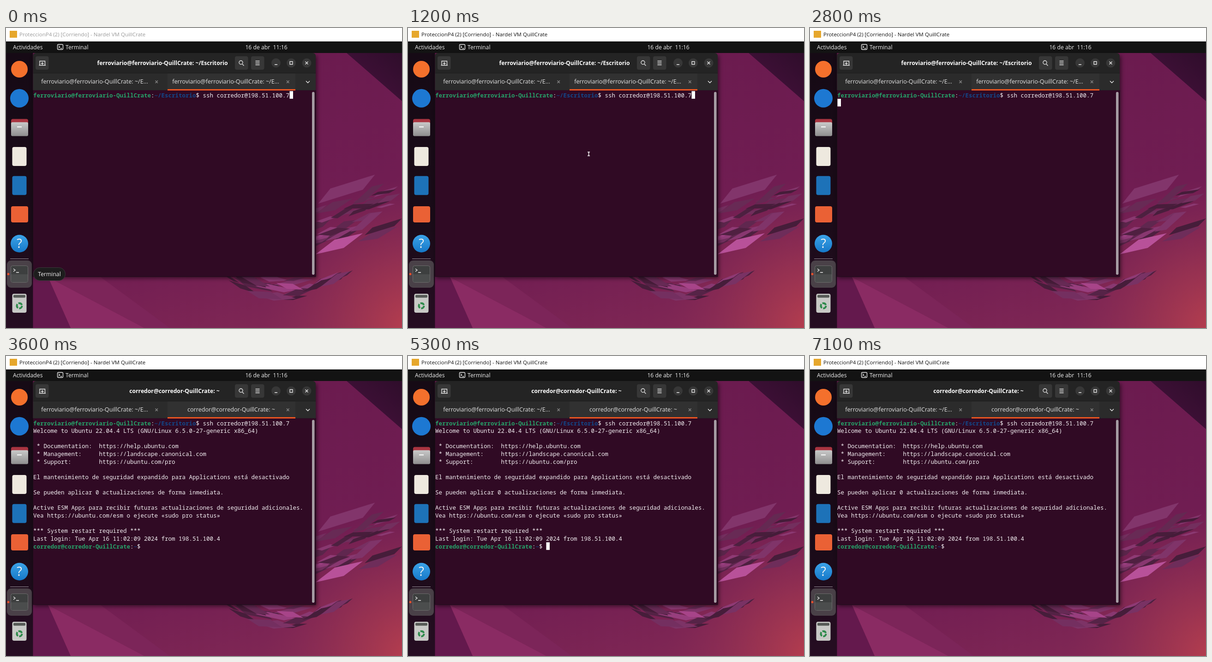
Write an HTML page that moves like this. It is 858 by 648 pixels and loops after 7.2 s.

```html
<!DOCTYPE html>
<html lang="es">
<head>
<meta charset="utf-8">
<title>Terminal</title>
<style>
html, body { margin: 0; width: 100%; height: 100%; overflow: hidden; background: #2c0a24; }
svg { display: block; width: 858px; height: 648px; }
text { font: 12.2px "Open Sans", "Noto Sans", sans-serif; fill: #f2f2f2; white-space: pre; }
.mid { text-anchor: middle; }
.title { font-weight: 700; fill: #fff; }
.tab { font-size: 12.6px; fill: #e4e4e4; }
.mono text { font: 12.5px "Noto Sans Mono", "DejaVu Sans Mono", monospace; fill: #f4f0f3; }
.user { fill: #26a269; font-weight: 700; }
.path { fill: #12488b; font-weight: 700; }
.line { fill: none; stroke: #eee; stroke-width: 1.3; }
</style>
</head>
<body>
<svg viewBox="0 0 858 648">
  <defs>
    <linearGradient id="wall" gradientUnits="userSpaceOnUse" x1="620" y1="60" x2="800" y2="660">
      <stop offset="0" stop-color="#6b1b4f"/><stop offset=".5" stop-color="#701d52"/><stop offset="1" stop-color="#842a55"/>
    </linearGradient>
    <radialGradient id="glow" gradientUnits="userSpaceOnUse" cx="880" cy="650" r="320">
      <stop offset="0" stop-color="#b83f4e"/><stop offset=".45" stop-color="#a03650" stop-opacity=".65"/>
      <stop offset="1" stop-color="#8a2c55" stop-opacity="0"/>
    </radialGradient>
    <linearGradient id="dusk" x1="1" y1="0" x2="0" y2="1">
      <stop offset="0" stop-color="#2f0d2b"/><stop offset="1" stop-color="#48123e"/>
    </linearGradient>
    <linearGradient id="dock" x2="0" y2="1">
      <stop offset="0" stop-color="#160a15"/><stop offset=".6" stop-color="#1a0b18"/><stop offset="1" stop-color="#260d22"/>
    </linearGradient>
    <linearGradient id="grey" x2="0" y2="1">
      <stop offset="0" stop-color="#c9c9c9"/><stop offset="1" stop-color="#8e8e8e"/>
    </linearGradient>
    <linearGradient id="blue" x2="0" y2="1">
      <stop offset="0" stop-color="#3ba3e8"/><stop offset="1" stop-color="#1678c8"/>
    </linearGradient>
    <filter id="soft"><feGaussianBlur stdDeviation="4"/></filter>
  </defs>

  <!-- wallpaper -->
  <path fill="url(#wall)" d="M0 28H858V648H0z"/>
  <path fill="url(#dusk)" d="M738 54H858V158z"/>
  <path fill="#8a2b63" d="M91 538L300 648H140z"/>
  <path fill="#7c2559" d="M91 538H205L355 648H300z"/>
  <path fill="#64194d" d="M58 538H91L140 648H58z"/>
  <path fill="url(#glow)" d="M400 300H858V648H400z"/>
  <g id="shards"></g>

  <!-- host title bar -->
  <path fill="#fff" d="M0 0H858V29H0z"/>
  <path fill="#e6a72c" d="M8 6h16v15H8z"/>
  <text id="host" x="29" y="18" style="font-size:11.5px">ProteccionP4 (2) [Corriendo] - Nardel VM QuillCrate</text>

  <!-- top panel -->
  <path fill="#131313" d="M0 29H858V54H0z"/>
  <text x="15" y="46">Actividades</text>
  <rect class="line" x="111.500" y="35.500" width="12" height="11" rx="2"/>
  <path class="line" d="M114 38.500l2.500 2.500l-2.500 2.500M118 44h3"/>
  <text x="129" y="46">Terminal</text>
  <text class="mid" x="564" y="45.500">16 de abr  11:16</text>

  <!-- dock -->
  <path fill="url(#dock)" d="M0 54H58.500V648H0z"/>
  <g id="icons"></g>
  <path stroke="#9a929a" d="M9 498.500H49"/>
  <rect x="2" y="502" width="54" height="59" rx="9" fill="#4a4148"/>
  <rect x="10.500" y="513.500" width="37" height="36" rx="4" fill="#3d3f3f" stroke="#6c6c6c"/>
  <path fill="#4b4d4d" d="M11 532H47V545q0 4-4 4H15q-4 0-4-4z"/>
  <path class="line" d="M16 520l4 3l-4 3M22 528h6"/>
  <circle cx="5" cy="531.500" r="2.500" fill="#e5502c"/>

  <!-- window -->
  <path filter="url(#soft)" opacity=".5" d="M60 60H674V541H60z"/>
  <path fill="#300a24" stroke="#1b0d18" d="M58.500 134H671V537H58.500z"/>
  <path fill="#242424" d="M58.500 98V61q0-7 7-7H664q7 0 7 7V98z"/>
  <path fill="#2b2b2b" d="M58.500 97.500H671V134.500H58.500z"/>
  <path stroke="#1c1c1c" d="M58.500 97.500H671"/>
  <path fill="#313131" d="M350 98H627V132H350z"/>
  <path fill="#e95420" d="M350 132H627V135H350z"/>
  <g id="buttons" fill="#373737"></g>
  <path class="line" d="M73 80.500V71.500H84.500V80.500M71.500 80.500H86M78.700 73.500v6M75.700 76.500h6"/>
  <circle class="line" cx="509" cy="74.500" r="4"/>
  <path class="line" d="M512 78l3.500 3.500M540.500 71.500h9m-9 4h9m-9 4h9M582 79h6M615 72.500h6v6h-6zM648.500 72.500l6 6m0-6l-6 6M650 114.500l4 4l4-4"/>
  <path class="line" style="stroke:#8c8c8c" d="M323.500 113.500l5.500 5.500m0-5.500l-5.500 5.500M608 113.500l5.500 5.500m0-5.500l-5.500 5.500"/>
  <text class="mid title" id="title" y="80"></text>
  <text class="mid tab" id="tab1" x="192" y="120"></text>
  <text class="mid tab" id="tab2" y="120"></text>
  <rect x="663" y="138" width="5.500" height="395" rx="2.700" fill="#a69da4"/>
  <g class="mono"><g id="command"></g><g id="output"></g></g>
  <rect id="caret" width="7.500" height="16.500" fill="#fff"/>

  <g id="tip">
    <rect x="59.500" y="517.500" width="69" height="28" rx="14" fill="#1d1d1d" stroke="#3a383a"/>
    <text class="mid" x="94" y="536">Terminal</text>
  </g>
  <path id="mouse" fill="none" stroke="#fff" stroke-width="1.500" d="M-2.500-4h5M0-4v8M-2.500 4h5"/>
</svg>
<script>
const $ = id => document.getElementById(id);
const LOOP = 7200, FOCUS = 1200, ENTER = 2600, LOGIN = 3200;
const BLINK_FROM = 3400, BLINK = 610;
const CELL = 7.5, ROW = 16.63, LEFT = 59, TOP = 149.5;
const box = 'QuillCrate', local = 'ferroviario@ferroviario-' + box, remote = 'corredor@corredor-' + box;

let seed = 7;
const rand = (lo = 0, hi = 1) => {
  seed = seed * 16807 % 2147483647;
  return lo + (hi - lo) * seed / 2147483647;
};

// A long thin facet, pointed at both ends
function shard(x, y, tilt, length, light) {
  const h = length * rand(.06, .13), bend = rand(-.25, .25) * length;
  return `<path fill="hsl(318 42% ${light}%)" transform="translate(${x} ${y}) rotate(${tilt})"
    d="M${-length / 2} 0L${bend} ${-h}L${length / 2} 0L${-bend} ${h}z"/>`;
}
const shade = () => 19 + 24 * rand() ** 2;

// Right fan rises to the right; the lower one hangs in an arc under the window
let facets = '';
for (let i = 0; i < 30; i++) {
  const u = rand(), y = 495 - 110 * rand() - 45 * u;
  facets += shard(672 + 165 * u, y, rand(-34, -8), rand(40, 95), shade());
}
for (let i = 0; i < 24; i++) {
  const u = rand(), arc = Math.PI * u;
  facets += shard(475 + 250 * u, 538 + 50 * rand() * Math.sin(arc), 28 * Math.cos(arc), rand(45, 90), shade());
}
facets += shard(738, 348, -27, 138, 36) + shard(722, 466, -24, 112, 52) + shard(615, 558, 14, 60, 46);
$('shards').innerHTML = facets;

// Dock icons at even steps
const rect = (x, y, w, h, r, fill) => `<rect x="${x}" y="${y}" width="${w}" height="${h}" rx="${r}" fill="${fill}"/>`;
const disc = (y, r, fill) => `<circle cx="29" cy="${y}" r="${r}" fill="${fill}"/>`;
const card = (y, fill) => rect(13.5, y - 20.5, 31, 41, 4, fill);
$('icons').innerHTML = [
  y => disc(y, 18, '#f4702c'),
  y => disc(y, 20, '#1d78d2'),
  y => rect(11, y - 18, 37, 20, 4, '#a83440') + rect(11, y - 11, 37, 30, 3, 'url(#grey)') + rect(24, y - 2, 10, 2, 0, '#fff'),
  y => card(y, '#eee9df'),
  y => card(y, '#1d72b8'),
  y => rect(11, y - 18, 37, 35, 4, '#ea6135'),
  y => disc(y, 19, 'url(#blue)') + `<text class="mid" x="29" y="${y + 9.5}" style="font-size:27px">?</text>`,
  y => '',
  y => card(y + 3, '#c8c9c6') + rect(16, y - 15, 26, 6, 2, '#555955') +
    `<circle cx="29" cy="${y + 8.5}" r="5.5" fill="none" stroke="#2d8a4a" stroke-width="4" stroke-dasharray="9 2.5"/>`
].map((icon, i) => icon(89 + 62.8 * i)).join('');

$('buttons').innerHTML =
  [64, 496, 531].map(x => `<rect x="${x}" y="61" width="28.5" height="29" rx="4"/>`).join('') +
  [585, 618, 651.5].map(x => `<circle cx="${x}" cy="75.5" r="10"/>`).join('');

const put = (row, html) => `<text x="${LEFT}" y="${TOP + row * ROW}">${html}</text>`;
const prompt = (user, path, rest) =>
  `<tspan class="user">${user}</tspan>:<tspan class="path">${path}</tspan>$ ${rest}`;

$('command').innerHTML = put(0, prompt(local, '~/Escritorio', 'ssh corredor@198.51.100.7'));
$('output').innerHTML = [
  'Welcome to Ubuntu 22.04.4 LTS (GNU/Linux 6.5.0-27-generic x86_64)',
  '',
  ' * Documentation:  https://help.ubuntu.com',
  ' * Management:     https://landscape.canonical.com',
  ' * Support:        https://ubuntu.com/pro',
  '',
  'El mantenimiento de seguridad expandido para Applications está desactivado',
  '',
  'Se pueden aplicar 0 actualizaciones de forma inmediata.',
  '',
  'Active ESM Apps para recibir futuras actualizaciones de seguridad adicionales.',
  'Vea https://ubuntu.com/esm o ejecute «sudo pro status»',
  '',
  '*** System restart required ***',
  'Last login: Tue Apr 16 11:02:09 2024 from 198.51.100.4',
  prompt(remote, '~', '')
].map((line, i) => put(i + 1, line)).join('');
$('tab1').textContent = local + ': ~/E...';

const show = (id, on) => $(id).style.display = on ? '' : 'none';
const label = (id, x, text) => { $(id).setAttribute('x', x); $(id).textContent = text; };

// Eased progress from 0 to 1 between two times
const ease = (t, from, to) => {
  const k = Math.max(0, Math.min(1, (t - from) / (to - from)));
  return k * k * (3 - 2 * k);
};

function draw(t) {
  const logged = t >= LOGIN;
  $('host').style.fill = t < FOCUS ? '#999' : '#111';
  label('title', logged ? 365 : 339, logged ? remote + ': ~' : local + ': ~/Escritorio');
  label('tab2', logged ? 488 : 476, logged ? remote + ': ~' : local + ': ~/E...');
  show('output', logged);

  const [col, row] = t < ENTER ? [74, 0] : logged ? [32, 16] : [0, 1];
  $('caret').setAttribute('x', LEFT + .5 + col * CELL);
  $('caret').setAttribute('y', 136.3 + row * ROW);
  show('caret', t < BLINK_FROM || Math.floor((t - BLINK_FROM) / BLINK) % 2 === 1);

  $('tip').style.opacity = 1 - ease(t, 400, 600);
  const enter = ease(t, 400, 800), drift = ease(t, 800, 1500);
  const x = 62 + 312 * enter + 29 * drift, y = 512 - 192 * enter - 79 * drift;
  show('mouse', t >= 400 && t < ENTER);
  $('mouse').setAttribute('transform', `translate(${x} ${y})`);
}

function tick() {
  draw(Math.floor(performance.now() % LOOP / 100) * 100);
  requestAnimationFrame(tick);
}
tick();
</script>
</body>
</html>
```
